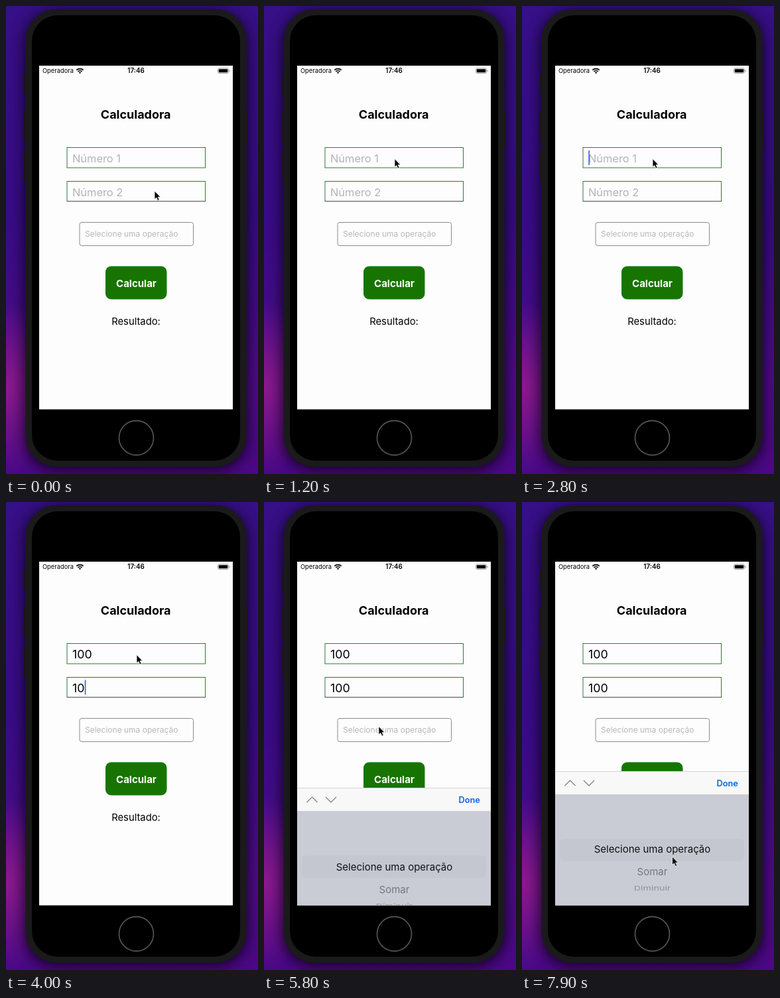
An HTML page for the animation above (8000 ms loop, 380 px wide and 706 px high).

```html
<!DOCTYPE html>
<html lang="pt">
<head>
<meta charset="utf-8">
<title>Calculadora</title>
<style>
  html, body { margin: 0; width: 100%; height: 100%; overflow: hidden; background: #2b0a6e; }
  svg { display: block; width: 380px; height: 706px; font-family: Inter, sans-serif; }
  .mid { text-anchor: middle; }
  .value { font-size: 17.8px; }
  .hint { font-size: 16.4px; fill: #b4b4b8; }
  .field { fill: none; stroke: #33773a; }
  .caret { fill: #4657e0; }
  .wheel { font-size: 15px; text-anchor: middle; }
</style>
</head>
<body>
<svg viewBox="0 0 380 706">
  <defs>
    <linearGradient id="backdrop" x2="0" y2="1">
      <stop offset="0" stop-color="#370f86"/>
      <stop offset=".45" stop-color="#370b86"/>
      <stop offset=".8" stop-color="#4c0b88"/>
      <stop offset="1" stop-color="#4a0886"/>
    </linearGradient>
    <radialGradient id="glow">
      <stop offset="0" stop-color="#8d1a8c"/>
      <stop offset="1" stop-color="#8d1a8c" stop-opacity="0"/>
    </radialGradient>
    <filter id="soft" x="-20%" y="-20%" width="140%" height="140%"><feGaussianBlur stdDeviation="11"/></filter>
    <clipPath id="screen"><rect x="50" y="90" width="292" height="518.500"/></clipPath>
    <clipPath id="wheelArea"><rect x="50" y="441" width="292" height="146"/></clipPath>
  </defs>

  <rect width="380" height="706" fill="url(#backdrop)"/>
  <ellipse cx="0" cy="575" rx="80" ry="130" fill="url(#glow)"/>
  <rect x="28" y="8" width="336" height="692" rx="48" opacity=".75" filter="url(#soft)"/>

  <g fill="#171717">
    <rect x="27" y="102" width="6" height="31" rx="2"/>
    <rect x="27" y="157" width="6" height="48" rx="2"/>
    <rect x="27" y="217" width="6" height="48" rx="2"/>
    <rect x="358" y="157" width="6" height="57" rx="2"/>
    <rect x="29.500" y="5" width="333" height="690" rx="47" fill="#1a1a1a"/>
    <rect x="39" y="14" width="314" height="672" rx="39" fill="#000"/>
  </g>
  <circle cx="196.500" cy="651.500" r="26" fill="none" stroke="#505050" stroke-width="1.800"/>

  <g clip-path="url(#screen)">
    <rect x="50" y="90" width="292" height="519" fill="#fdfdfd"/>

    <text x="55" y="101" font-size="9.300">Operadora</text>
    <g fill="none" stroke="#000" stroke-width="1.700">
      <path d="M106.300 96.700a7.500 7.500 0 0 1 10.400 0M108.300 99a4.600 4.600 0 0 1 6.400 0"/>
      <path d="M111.500 102.200l-1.700-1.900a2.600 2.600 0 0 1 3.400 0z" fill="#000" stroke="none"/>
    </g>
    <text class="mid" x="196" y="101" font-size="9.800" font-weight="600">17:46</text>
    <rect x="319.500" y="94" width="16" height="7.500" rx="2" fill="none" stroke="#888" stroke-width=".8"/>
    <rect x="320.700" y="95.200" width="13.600" height="5.100" rx="1"/>
    <path d="M337 96.500v2.600" stroke="#888"/>

    <text class="mid" x="195.700" y="170" font-size="18" font-weight="700">Calculadora</text>
    <rect class="field" x="92" y="213.500" width="208.500" height="30.500"/>
    <rect class="field" x="92" y="264.500" width="208.500" height="30"/>
    <path d="M92 294.500h208.500" stroke="#4b4b4b"/>
    <g id="inputs"></g>

    <rect x="111" y="326.500" width="171.500" height="35" rx="3" fill="none" stroke="#8a8a8a"/>
    <text x="119" y="348" font-size="12" fill="#b8b8bb">Selecione uma operação</text>
    <rect x="150.500" y="393" width="91.500" height="49" rx="8" fill="#187400" stroke="#127c12"/>
    <text class="mid" x="196.500" y="423.500" font-size="15" font-weight="700" fill="#fff">Calcular</text>
    <text class="mid" x="196" y="481" font-size="14.800">Resultado:</text>

    <g id="picker">
      <rect x="50" y="406" width="292" height="35" fill="#f8f8f8"/>
      <path d="M50 406.500h292" stroke="#d4d4d6"/>
      <path d="M64.500 428l8-8 8 8M93 420l8 8 8-8" fill="none" stroke="#858589" stroke-width="1.400"/>
      <text x="293.500" y="429" font-size="12.800" font-weight="600" fill="#0a66e0">Done</text>
      <rect x="50" y="441" width="292" height="168" fill="#c9ccd4"/>
      <rect x="57" y="508" width="278" height="34" rx="6" fill="#c4c7cf"/>
      <g clip-path="url(#wheelArea)">
        <g id="wheel" class="wheel">
          <text x="196.500" y="531" fill="#111215">Selecione uma operação</text>
          <text x="196.500" y="565" fill="#74767c">Somar</text>
          <text transform="translate(196.500 588) scale(1 .65)" font-size="14.300" fill="#8e9097">Diminuir</text>
        </g>
      </g>
    </g>
  </g>

  <path id="cursor" d="M0 0V12.600L2.800 10 5 14.600 7.200 13.600 5.100 9.200H9z" stroke="#fff" stroke-width=".8"/>
</svg>

<script>
const LOOP = 8000;
const $ = id => document.getElementById(id);
const clamp = v => Math.min(1, Math.max(0, v));
const smooth = v => v * v * (3 - 2 * v);

function makeInput(hint, baseline, focus, blur, keyTimes) {
  const add = (tag, attrs) => {
    const el = document.createElementNS("http://www.w3.org/2000/svg", tag);
    for (const name in attrs) el.setAttribute(name, attrs[name]);
    return $("inputs").appendChild(el);
  };
  const text = add("text", { x: 100, y: baseline });
  const caret = add("rect", { class: "caret", y: baseline - 18, width: 1.6, height: 22 });
  return t => {
    const typed = "100".slice(0, keyTimes.filter(k => t >= k).length);
    text.textContent = typed || hint;
    text.setAttribute("class", typed ? "value" : "hint");
    const width = typed ? text.getComputedTextLength() : 0;
    caret.setAttribute("x", 100.3 + width);
    // The caret blinks with a soft fade, restarting at every key
    const idle = t - (typed ? keyTimes[typed.length - 1] : focus);
    const blink = clamp(0.5 + 1.2 * Math.cos(Math.PI * 2 * (idle - 200) / 1000));
    caret.setAttribute("opacity", t < focus || t >= blur ? 0 : blink);
  };
}

const inputs = [
  makeInput("Número 1", 236, 2500, 3600, [3000, 3200, 3400]),
  makeInput("Número 2", 286.5, 3600, 5600, [3800, 3950, 4200])
];

// time, x, y of the pointer's tip
const route = [
  [200, 224, 279], [1100, 197, 230.5], [4700, 197, 230.5], [5100, 169, 297],
  [5450, 173, 338.5], [6700, 173, 338.5], [7500, 226.5, 537], [7700, 226.5, 537], [7900, 226.5, 535]
];

function pointer(t) {
  const next = route.findIndex(p => p[0] > t);
  if (next === 0) return route[0].slice(1);
  if (next < 0) return route[route.length - 1].slice(1);
  const a = route[next - 1], b = route[next];
  const k = smooth((t - a[0]) / (b[0] - a[0]));
  return [a[1] + (b[1] - a[1]) * k, a[2] + (b[2] - a[2]) * k];
}

function draw(now) {
  const t = now % LOOP;
  inputs.forEach(update => update(t));
  const slide = 204 * (1 - clamp((t - 5600) / 400)) ** 3;
  $("picker").setAttribute("transform", `translate(0 ${slide})`);
  $("picker").setAttribute("visibility", t < 5600 ? "hidden" : "visible");
  const drag = -2 * smooth(clamp((t - 7700) / 200));
  $("wheel").setAttribute("transform", `translate(0 ${drag})`);
  $("cursor").setAttribute("transform", `translate(${pointer(t)})`);
  requestAnimationFrame(draw);
}
requestAnimationFrame(draw);
</script>
</body>
</html>
```
